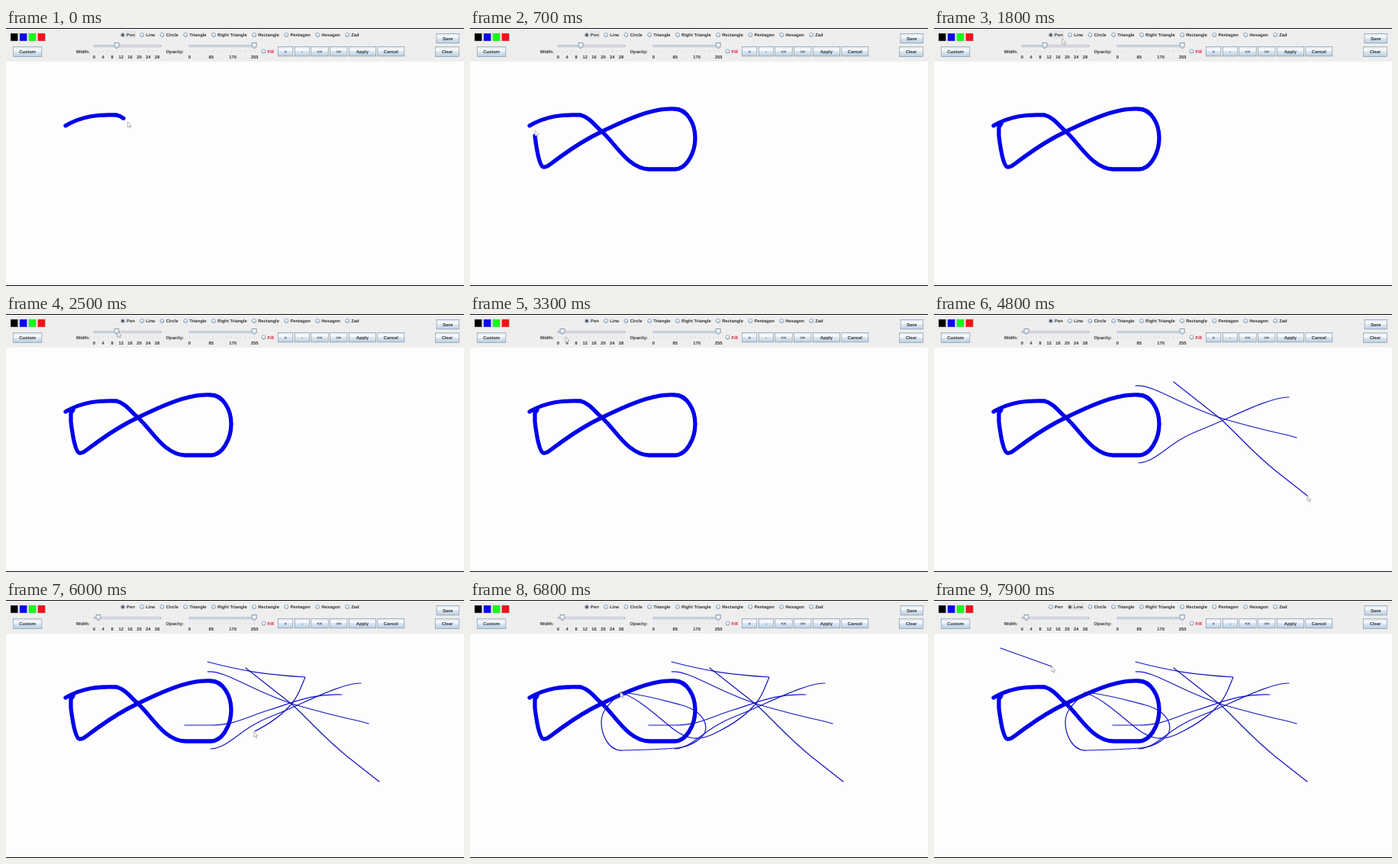
An HTML page that plays this animation: 600x338 px, repeating every 8000 ms.

```html
<!DOCTYPE html>
<html lang="en">
<head>
<meta charset="utf-8">
<title>Paint demo</title>
<style>
  html, body { margin: 0; width: 100%; height: 100%; overflow: hidden; background: #fefdfe; }
  svg { display: block; width: 100vw; height: 100vh; }
  text { font: bold 5.8px "Liberation Sans", Arial, sans-serif; fill: #333; text-rendering: geometricPrecision; }
  .mid { text-anchor: middle; }
  #art * { fill: none; stroke-linecap: round; stroke-linejoin: round; }
</style>
</head>
<body>
<svg viewBox="0 0 600 338" preserveAspectRatio="none">
  <defs>
    <linearGradient id="metal" x2="0" y2="1">
      <stop offset="0" stop-color="#dde8f3"/>
      <stop offset=".35" stop-color="#fbfcfe"/>
      <stop offset=".5" stop-color="#dde8f3"/>
      <stop offset="1" stop-color="#b8cfe5"/>
    </linearGradient>
  </defs>
  <rect width="600" height="338" fill="#111"/>
  <rect y="1" width="600" height="336" fill="#fefdfe"/>
  <rect y="1" width="600" height="43" fill="#eee"/>
  <g id="bar"></g>
  <g id="art"></g>
  <path id="cursor" d="M0 0V7.2L1.7 5.7L2.9 8.3L4 7.8L2.9 5.3L5 5.2Z" fill="#fff" stroke="#858585" stroke-width=".6"/>
</svg>
<script>
const LOOP = 8000, STEP = 100;
const LINE_PICKED = 7300, FOCUS_LOST = 2400;
const [bar, art, cursor] = ['bar', 'art', 'cursor'].map(id => document.getElementById(id));

function set(el, attrs) {
  for (const k in attrs) el.setAttribute(k, attrs[k]);
  return el;
}
function add(parent, tag, attrs, text = '') {
  const el = set(document.createElementNS('http://www.w3.org/2000/svg', tag), attrs);
  el.textContent = text;
  return parent.appendChild(el);
}
const label = (x, y, text, attrs) => add(bar, 'text', { x, y, ...attrs }, text);
const show = (el, on) => el.setAttribute('visibility', on ? 'visible' : 'hidden');
const mix = (a, b, k) => a + (b - a) * k;
const part = (a, b, t) => Math.max(0, Math.min(1, (t - a) / (b - a)));
const ease = k => k * k * (3 - 2 * k);

// Toolbar
['#000', '#0808f4', '#19fa19', '#f2121a'].forEach((fill, i) =>
  add(bar, 'rect', { x: 6 + i * 11.9, y: 7, width: 9.6, height: 10, fill, stroke: '#aaa', 'stroke-width': .4 }));

function button(x, y, width, text) {
  add(bar, 'rect', { x, y, width, height: 12.6, fill: 'url(#metal)', stroke: '#7a8a99', 'stroke-width': .6 });
  label(x + width / 2, y + 8.4, text, { class: 'mid' });
  return x + width;
}
button(9.3, 24.8, 37.6, 'Custom');
button(564, 7.3, 29.3, 'Save');
button(562.5, 24.8, 30.8, 'Clear');
let edge = 354.2;
for (const text of ['+', '-', '<<', '>>', 'Apply', 'Cancel'])
  edge = button(edge + 2.4, 24.3, text.length > 2 ? 35 : 16 + text.length * 3.2, text);

function radio(x, y, text, style = '') {
  add(bar, 'circle', { cx: x, cy: y, r: 2.6, fill: 'url(#metal)', stroke: '#7a8a99', 'stroke-width': .7 });
  const dot = add(bar, 'circle', { cx: x, cy: y, r: 1.5, fill: '#222', visibility: 'hidden' });
  const width = label(x + 5.1, y + 2.2, text, { style }).getComputedTextLength();
  return { dot, x: x + 4.4, width: width + 1.6, end: x + 5.1 + width };
}
const tools = [];
let radioX = 153;
for (const name of ['Pen', 'Line', 'Circle', 'Triangle', 'Right Triangle', 'Rectangle', 'Pentagon', 'Hexagon', 'Zad']) {
  const tool = radio(radioX, 9, name);
  tools.push(tool);
  radioX = tool.end + 9.4;
}
radio(337.4, 30.6, 'Fill', 'fill:#e01433');
const focusBox = add(bar, 'rect', { y: 5, height: 8, fill: 'none', stroke: '#b9c8d8', 'stroke-width': .5 });

function slider(x, name, nameX, max, step, gap) {
  label(nameX, 32.8, name);
  add(bar, 'rect', { x, y: 22.3, width: 88, height: 2.6, fill: '#e4e8ec', stroke: '#8d9aa7', 'stroke-width': .5 });
  const filled = add(bar, 'rect', { x, y: 22.6, height: 2, fill: '#c4d4e6' });
  const count = max / step;
  for (let i = 0; i <= 14; i++)
    add(bar, 'rect', { x: x + .3 + i * gap * count / 14, y: 29.5, width: .6, height: 2, fill: '#c8cbce' });
  for (let i = 0; i <= count; i++) label(x + .4 + i * gap, 40, i * step, { class: 'mid' });
  const thumb = add(bar, 'path', { d: 'M-3 -4H3V.6L0 3.6L-3 .6Z', fill: 'url(#metal)', stroke: '#66788c', 'stroke-width': .7 });
  return at => {
    set(filled, { width: at - x });
    set(thumb, { transform: `translate(${at} 23.5)` });
  };
}
const setWidth = slider(115, 'Width:', 91.8, 28, 4, 11.8);
slider(240, 'Opacity:', 209.6, 255, 85, 28.4)(325.2);

// A pen stroke drawn at steady speed; the pointer runs slightly ahead of a thick brush
function stroke(start, end, d, width = 1.2, color = '#1515c0') {
  const el = add(art, 'path', { d, stroke: color, 'stroke-width': width });
  const total = el.getTotalLength();
  const reach = t => total * part(start, end, t);
  const head = t => {
    const p = el.getPointAtLength(reach(t + width * 2));
    return [p.x, p.y];
  };
  const draw = t => {
    show(el, t >= start);
    set(el, { 'stroke-dasharray': t < end ? `${reach(t)} ${total * 2}` : 'none' });
  };
  return { start, end, head, draw };
}
const strokes = [
  stroke(-116, 725, `M78 128C100 115 122 113 145 114C156 117 163 127 172 135C190 150 206 184 235 185H268
    C284 185 295 163 295 144C295 125 284 106 268 106C240 104 205 120 172 136C145 149 132 159 118 169
    S101 183 96 182C91 182 87 158 85 141V130L88 125.5`, 5.3, '#0000ea'),
  stroke(3650, 3980, 'M264 94C290 92 325 122 385 139S455 156 475 162'),
  stroke(4080, 4380, 'M465 109C440 108 385 138 346 153S292 194 268 195'),
  stroke(4480, 4800, 'M314 89L375 137C400 160 415 179 447 205L489 238'),
  stroke(4980, 5320, 'M440 124C400 122 375 135 345 144S300 164 268 164H234'),
  stroke(5640, 6780, `M264 81C310 93 340 98 392 101C388 110 384 124 375 135S350 160 324 173
    C300 186 284 183 265 168S215 124 197 122C180 138 172 146 172 160S180 198 200 197
    C225 196 250 196 270 194S308 181 309 168C309 150 290 141 275 137S220 122 197 121`)
];

// The Line tool stretches a segment from its anchor to the pointer
const drag = { start: 7520, end: 7900, from: [87, 63], to: [154, 87] };
drag.head = t => drag.from.map((v, i) => mix(v, drag.to[i], part(drag.start, drag.end, t)));
const band = add(art, 'line', { x1: 87, y1: 63, stroke: '#1515c0', 'stroke-width': 1.2 });

// Pointer: follows the active drag, otherwise eases between resting places
const drags = [...strokes, drag];
const stops = [
  [1000, 87, 128], [1700, 168, 14], [1900, 168, 14], [2350, 146, 23], [2550, 146, 23],
  [3100, 122, 25], [3300, 125, 30], [7180, 178, 9], [LINE_PICKED, 178, 9],
  ...drags.flatMap(s => [s.start, s.end].map(t => [t, ...s.head(t)]))
].sort((a, b) => a[0] - b[0]);

function pointer(t) {
  const active = drags.find(s => t >= s.start && t <= s.end);
  if (active) return active.head(t);
  const next = stops.findIndex(s => s[0] > t);
  if (next < 0) return drag.to;
  const [t0, ...from] = stops[next - 1], [t1, ...to] = stops[next];
  return from.map((v, i) => mix(v, to[i], ease(part(t0, t1, t))));
}

function render(t) {
  const lineTool = t >= LINE_PICKED;
  const current = tools[lineTool ? 1 : 0];
  tools.forEach(tool => show(tool.dot, tool === current));
  show(focusBox, t < FOCUS_LOST || lineTool);
  set(focusBox, { x: current.x, width: current.width });
  setWidth(mix(145, 121, ease(part(2550, 3100, t))));
  strokes.forEach(s => s.draw(t));
  const [x2, y2] = drag.head(t);
  show(set(band, { x2, y2 }), t > drag.start);
  set(cursor, { transform: `translate(${pointer(t).join(' ')})` });
}

let origin;
function tick(now) {
  origin ??= now;
  // The picture advances in steps; a small allowance absorbs timer lag
  render(Math.floor((now - origin + 30) / STEP) * STEP % LOOP);
  requestAnimationFrame(tick);
}
render(0);
requestAnimationFrame(tick);
</script>
</body>
</html>
```
